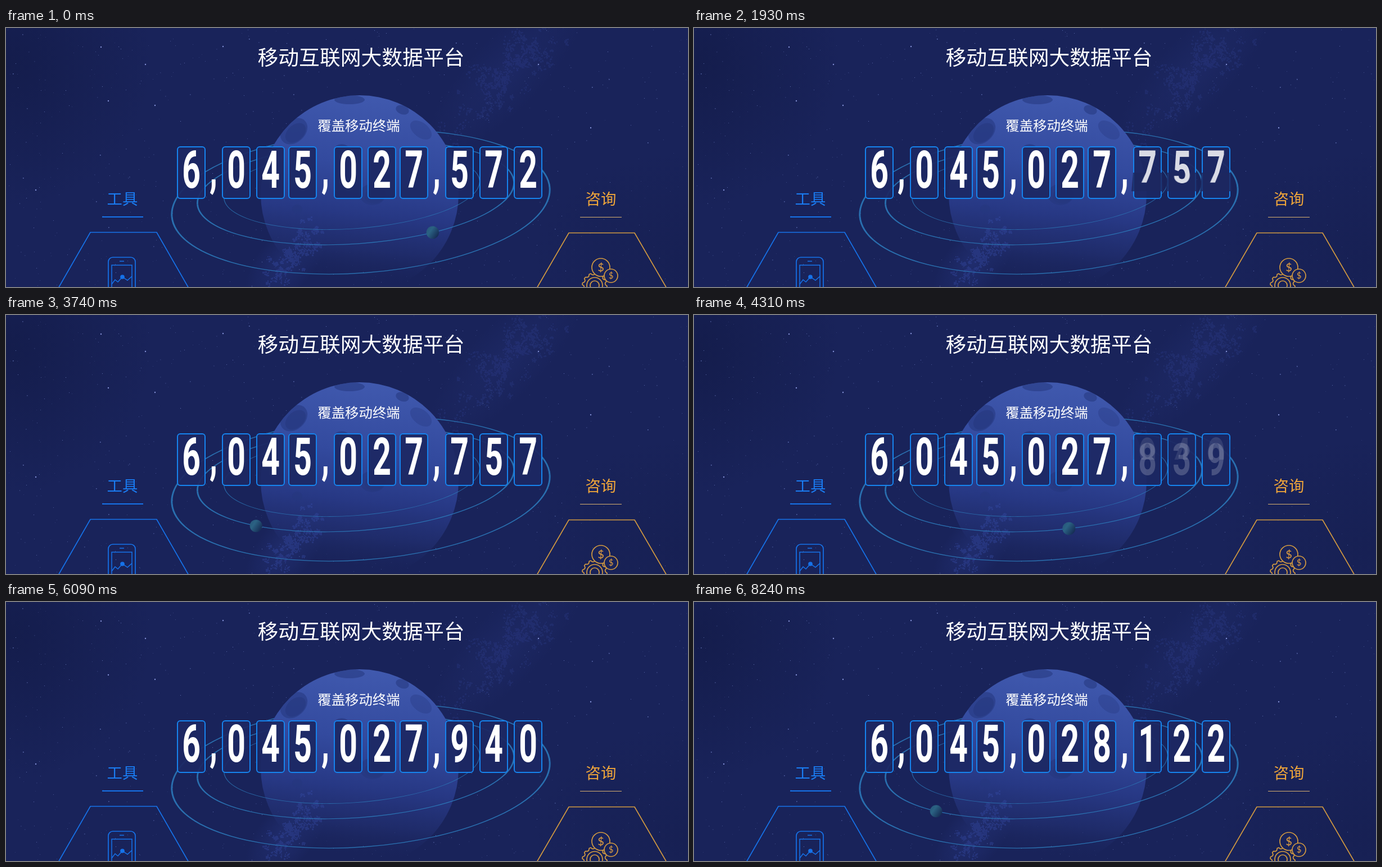
An HTML page with a canvas that plays this animation: 1213x462 px, repeating every 8340 ms.

```html
<!DOCTYPE html>
<html lang="zh-CN">
<head>
<meta charset="utf-8">
<title>移动互联网大数据平台</title>
<style>
html, body { margin: 0; width: 100%; height: 100%; overflow: hidden; background: #19235a; }
#stage { position: relative; width: 1213px; height: 462px; overflow: hidden; }
canvas, svg { position: absolute; left: 0; top: 0; }
svg text { font-family: "Noto Sans CJK SC", "Noto Sans CJK", sans-serif; text-anchor: middle; }
svg .num, .half b { font: 700 92px Roboto, sans-serif; }
svg .cash { font-family: Lato, sans-serif; fill: #e3a040; }
.line { fill: none; stroke-width: 1.7; }
.blue { stroke: #1673ea; }
.gold { stroke: #d39a40; }
.card { position: absolute; top: 211px; width: 51px; height: 94px; perspective: 350px; }
.card::before {
  content: ""; position: absolute; inset: 0; box-sizing: border-box;
  border: 2px solid #1684ee; border-radius: 6px; background: rgba(28, 40, 99, .93);
}
.half { position: absolute; left: 0; width: 51px; height: 47px; overflow: hidden; }
.half b {
  position: absolute; left: -20px; width: 91px; height: 94px; line-height: 94px;
  text-align: center; color: #fff; transform: scaleX(.62);
}
.top { top: 0; transform-origin: 50% 100%; }
.top b { top: -4px; }
.low { top: 47px; transform-origin: 50% 0; }
.low b { top: -51px; }
</style>
</head>
<body>
<div id="stage">
<canvas id="sky" width="1213" height="462"></canvas>
<svg width="1213" height="462" viewBox="0 0 1213 462">
  <defs>
    <linearGradient id="moonFill" x1=".55" y1="0" x2=".45" y2="1">
      <stop offset="0" stop-color="#4059ae"/>
      <stop offset=".35" stop-color="#334a9e"/>
      <stop offset=".6" stop-color="#273884"/>
      <stop offset=".78" stop-color="#202d6d" stop-opacity=".85"/>
      <stop offset=".94" stop-color="#1a255c" stop-opacity="0"/>
    </linearGradient>
    <linearGradient id="ballFill" x1="0" y1=".1" x2="1" y2=".8">
      <stop offset="0" stop-color="#27567a"/>
      <stop offset=".35" stop-color="#2b6283"/>
      <stop offset="1" stop-color="#13264f"/>
    </linearGradient>
    <clipPath id="disc"><circle cx="629" cy="296" r="176"/></clipPath>
  </defs>
  <g id="back" fill="#2c78b8"></g>
  <circle cx="629" cy="296" r="176" fill="url(#moonFill)"/>
  <g clip-path="url(#disc)" fill="#25377f" fill-opacity=".55">
    <ellipse cx="512" cy="184" rx="27" ry="20" transform="rotate(-42 512 184)"/>
    <ellipse cx="515" cy="187" rx="21" ry="14" transform="rotate(-42 515 187)"/>
    <ellipse cx="611" cy="128" rx="27" ry="8"/>
    <ellipse cx="705" cy="146" rx="12" ry="8" transform="rotate(20 705 146)"/>
    <ellipse cx="738" cy="182" rx="22" ry="13" transform="rotate(38 738 182)" fill-opacity=".35"/>
    <ellipse cx="597" cy="216" rx="13" ry="9"/>
    <ellipse cx="652" cy="297" rx="23" ry="19"/>
    <ellipse cx="655" cy="300" rx="17" ry="13"/>
    <ellipse cx="518" cy="323" rx="9" ry="8"/>
  </g>
  <path id="dust" fill="#3a50ae" fill-opacity=".3"/>
  <g id="front" fill="#2c78b8"></g>

  <g fill="#fff">
    <text x="631.5" y="66" font-size="36.8">移动互联网大数据平台</text>
    <text x="627.5" y="183" font-size="24.4">覆盖移动终端</text>
    <text class="num" transform="translate(369 281) scale(.62 1)">,</text>
    <text class="num" transform="translate(568 281) scale(.62 1)">,</text>
    <text class="num" transform="translate(766 281) scale(.62 1)">,</text>
  </g>

  <text x="207" y="315" font-size="27.4" fill="#1a7cf2">工具</text>
  <g class="line blue">
    <path d="M171 337H244" stroke-width="2"/>
    <path d="M93 464 150 364.500H268L325 464"/>
    <rect x="182" y="409" width="48" height="70" rx="8"/>
    <path d="M188 470V423H224V470M202 416H210" stroke-width="1.500"/>
    <path d="M188 457 194 449 199 453 207 444 216 450 224 443" stroke-width="1.500"/>
    <circle cx="207" cy="444" r="3" fill="#1673ea"/>
  </g>

  <text x="1058" y="315" font-size="27.4" fill="#f0a63a">咨询</text>
  <path d="M1021 337.500H1095" stroke="#d8b070"/>
  <g class="line gold">
    <path d="M944 464 1001 365.500H1118L1175 464"/>
    <path id="gear"/>
    <circle cx="1047" cy="459" r="14"/>
    <circle cx="1047" cy="459" r="8"/>
    <circle cx="1058" cy="427" r="16" fill="#19235a"/>
    <circle cx="1076" cy="442" r="12" fill="#19235a"/>
  </g>
  <text class="cash" x="1058" y="434" font-size="20">$</text>
  <text class="cash" x="1076" y="447" font-size="15">$</text>
</svg>
</div>
<script>
const $ = id => document.getElementById(id);
const stage = $('stage');
const rad = deg => deg * Math.PI / 180;
const svgEl = (tag, parent, attrs) => {
  const el = document.createElementNS('http://www.w3.org/2000/svg', tag);
  for (const k in attrs) el.setAttribute(k, attrs[k]);
  return parent.appendChild(el);
};

// Night sky
let seed = 7;
const rnd = () => (seed = (seed * 16807) % 2147483647) / 2147483647;
const bell = () => (rnd() + rnd() + rnd()) / 1.5 - 1;
const sky = $('sky').getContext('2d');

function glow(x, y, rx, ry, deg, rgb, alpha) {
  sky.save();
  sky.translate(x, y);
  sky.rotate(rad(deg));
  sky.scale(rx, ry);
  const g = sky.createRadialGradient(0, 0, 0, 0, 0, 1);
  g.addColorStop(0, `rgba(${rgb},${alpha})`);
  g.addColorStop(1, `rgba(${rgb},0)`);
  sky.fillStyle = g;
  sky.fillRect(-1, -1, 2, 2);
  sky.restore();
}

// Path of small squares scattered in clumps over a tilted ellipse
function speckle(x, y, rx, ry, deg, clumps) {
  const c = Math.cos(rad(deg)), s = Math.sin(rad(deg));
  let d = '';
  for (let i = 0; i < clumps; i++) {
    const u = bell() * rx, v = bell() * ry, spread = 4 + 10 * rnd();
    for (let k = 0; k < 12; k++) {
      const px = x + u * c - v * s + bell() * spread;
      const py = y + u * s + v * c + bell() * spread;
      const w = rnd() < .3 ? 3 : 2;
      d += `M${Math.round(px)} ${Math.round(py)}h${w}v${w}h${-w}z`;
    }
  }
  return d;
}

function paintSky() {
  sky.fillStyle = '#19235a';
  sky.fillRect(0, 0, 1213, 462);
  glow(0, 60, 260, 260, 0, '18,26,70', .7);
  glow(1213, 420, 280, 200, 0, '20,28,74', .4);
  glow(890, 80, 190, 65, -46, '46,62,140', .2);
  glow(500, 415, 100, 50, -50, '46,64,148', .35);
  sky.fillStyle = 'rgba(52,70,156,.22)';
  sky.fill(new Path2D(speckle(890, 80, 170, 60, -46, 110)));
  for (let i = 0; i < 650; i++) {
    const size = rnd() < .15 ? 1.6 : 1;
    sky.fillStyle = `rgba(140,160,235,${.15 + .5 * rnd() ** 3})`;
    sky.fillRect(Math.round(rnd() * 1213), Math.round(rnd() * 462), size, size);
  }
  sky.fillStyle = 'rgba(165,180,255,.75)';
  for (const [x, y] of [[947, 65], [265, 138], [169, 34], [248, 65], [53, 289], [1040, 178], [386, 33], [182, 130]]) {
    sky.beginPath();
    sky.arc(x, y, 1.2, 0, 7);
    sky.fill();
  }
}
paintSky();
$('dust').setAttribute('d', speckle(510, 405, 95, 42, -52, 60));

// Rings: thicker at the sides than at the bottom
const orbit = { x: 622, y: 294.2, a: 282.6, b: 90.6, tilt: -4.08 };
function ring(x, y, a, b, tilt, w, h, opacity) {
  for (const [id, s] of [['back', 1], ['front', 0]]) {
    svgEl('path', $(id), {
      d: `M${-a} 0A${a} ${b} 0 0 ${s} ${a} 0H${a - w}A${a - w} ${b - h} 0 0 ${1 - s} ${w - a} 0Z`,
      transform: `translate(${x} ${y}) rotate(${tilt})`, opacity
    });
  }
}
ring(631, 310.5, 338.5, 127, -4.36, 3, 1.3, .9);
ring(orbit.x, orbit.y, orbit.a + 1, orbit.b + .6, orbit.tilt, 2.8, 1.2, .9);
ring(615, 288, 228.5, 70.5, -3.9, 1.3, .9, .8);

const balls = ['back', 'front'].map(id => svgEl('circle', $(id), { fill: 'url(#ballFill)' }));

// Gear outline
const teeth = 12;
$('gear').setAttribute('d', Array.from({ length: teeth * 4 }, (_, i) => {
  const angle = (i + .5) / (teeth * 4) * 2 * Math.PI;
  const r = i % 4 < 2 ? 22 : 19;
  return (i ? 'L' : 'M') + (1047 + r * Math.cos(angle)).toFixed(1) + ' ' + (459 + r * Math.sin(angle)).toFixed(1);
}).join('') + 'Z');

// Flip counter
const cards = [304, 384, 445, 502, 583, 643, 700, 781, 842, 903].map(x => {
  const card = document.createElement('div');
  card.className = 'card';
  card.style.left = x + 'px';
  const half = cls => {
    const el = document.createElement('div');
    el.className = 'half ' + cls;
    el.append(document.createElement('b'));
    return card.appendChild(el);
  };
  const parts = { top: half('top'), low: half('low'), flap: half('low') };
  stage.append(card);
  return parts;
});

const LOOP = 8340, FLIP = 1070;
const counts = [
  { at: -FLIP, value: '6045027572' },
  { at: 1163, value: '6045027757' },
  { at: 4032, value: '6045027940' },
  { at: 6920, value: '6045028122' }
];
const clamp = v => Math.max(0, Math.min(1, v));

function setHalf(el, digit, opacity) {
  const b = el.firstChild;
  if (b.textContent !== digit) b.textContent = digit;
  el.style.opacity = opacity;
}

function drawCard({ top, low, flap }, digit, p) {
  const early = p < .5, still = p >= 1;
  const before = String((+digit + 9) % 10);
  const alpha = still ? 1 : clamp(1.4 * p - .17);
  setHalf(top, digit, early ? alpha * .6 : alpha);
  setHalf(low, early ? before : '', alpha);
  setHalf(flap, early ? before : digit, alpha);
  flap.className = 'half ' + (early ? 'top' : 'low');
  flap.style.background = still ? 'none' : '#1b265f';
  flap.style.transform = still ? 'none' : `rotateX(${early ? -180 * p : 180 * (1 - p)}deg)`;
}

function drawCounter(t) {
  const n = counts.findLastIndex(c => t >= c.at);
  const { at, value } = counts[n];
  const old = n ? counts[n - 1].value : value;
  const p = clamp((t - at) / FLIP);
  cards.forEach((card, i) => drawCard(card, value[i], value[i] === old[i] ? 1 : p));
}

function drawBall(t) {
  const mean = 64.1 - .0792 * t;
  const phi = rad(mean - 4 * Math.cos(rad(mean)));
  const tilt = rad(orbit.tilt);
  const u = orbit.a * Math.cos(phi), v = orbit.b * Math.sin(phi);
  const near = Math.sin(phi) > 0;
  balls.forEach((ball, i) => {
    ball.setAttribute('cx', orbit.x + u * Math.cos(tilt) - v * Math.sin(tilt));
    ball.setAttribute('cy', orbit.y + u * Math.sin(tilt) + v * Math.cos(tilt));
    ball.setAttribute('r', 9.5 + 2 * Math.sin(phi));
    ball.setAttribute('visibility', near === (i === 1) ? 'visible' : 'hidden');
  });
}

function frame() {
  const t = performance.now() % LOOP;
  drawBall(t);
  drawCounter(t);
  requestAnimationFrame(frame);
}
frame();
</script>
</body>
</html>
```
